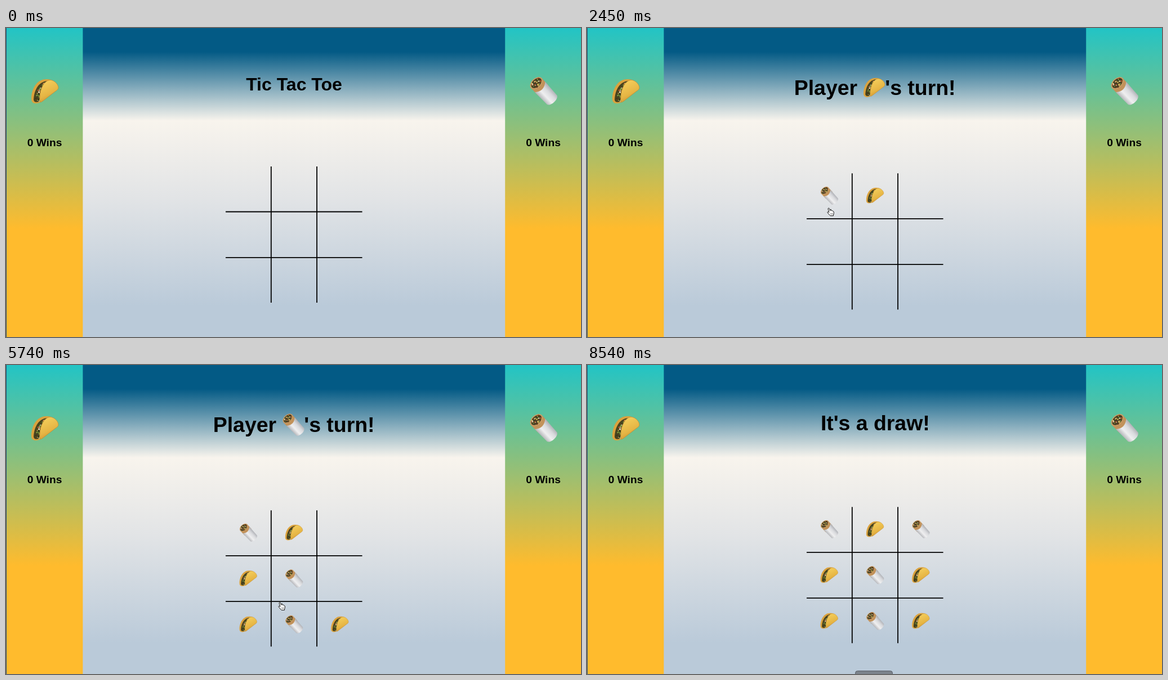
Write an HTML page that moves like this. It is 1021x549 px and loops after 8610 ms.

```html
<!DOCTYPE html>
<html lang="en">
<head>
<meta charset="utf-8">
<title>Tic Tac Toe</title>
<style>
  html, body { margin: 0; width: 100%; height: 100%; overflow: hidden; }
  svg { display: block; width: 1021px; height: 549px; }
  text { font: bold 19.2px "Liberation Sans", Arial, sans-serif; text-anchor: middle; }
  .title { font-size: 32px; }
  .status { font-size: 37.4px; }
  .start { text-anchor: start; }
</style>
</head>
<body>
<svg viewBox="0 0 1021 549">
  <defs>
    <linearGradient id="side" x2="0" y2="1">
      <stop stop-color="#22c4c5"/><stop offset=".65" stop-color="#ffbb2d"/>
    </linearGradient>
    <linearGradient id="sky" x2="0" y2="1">
      <stop offset=".077" stop-color="#035a85"/><stop offset=".3" stop-color="#f8f4ed"/>
      <stop offset=".55" stop-color="#e2e4e6"/><stop offset=".9" stop-color="#bacad9"/>
    </linearGradient>
    <linearGradient id="shell" x1=".3" x2=".7" y2="1">
      <stop stop-color="#f5cf5c"/><stop offset=".6" stop-color="#e6b544"/><stop offset="1" stop-color="#c98a2a"/>
    </linearGradient>
    <linearGradient id="foil">
      <stop stop-color="#b3b4b8"/><stop offset=".35" stop-color="#efeff0"/>
      <stop offset=".7" stop-color="#d9dadd"/><stop offset="1" stop-color="#aeb0b5"/>
    </linearGradient>

    <g id="taco">
      <path fill="#dba23d" d="M-24 14C-24-4-14-21 2-21C14-22 20-14 20-7L-10 21C-20 24-24 20-24 14Z"/>
      <path fill="#47431f" d="M-20 15C-19-3-10-18 6-18L8-10L-8 18C-15 21-20 20-20 15Z"/>
      <g id="tacoFilling"></g>
      <path fill="url(#shell)" stroke="#c08730" stroke-width=".7"
        d="M-9 18C-10 2-5-14 6-19C14-22 24-13 24-6C24-3 21-1 18 1L-4 18C-7 20-9 21-9 18Z"/>
    </g>
    <g id="burrito" transform="rotate(-43)">
      <path fill="#c2925a" d="M-13-19V0H13V-19Z"/>
      <path fill="url(#foil)" d="M-13-8Q0 3 13-9L12 23C9 30-9 30-12 23Z"/>
      <ellipse cy="-18" rx="13" ry="8.5" fill="#cb9d63"/>
      <ellipse cy="-18" rx="11" ry="6.8" fill="#453e24"/>
      <g id="burritoFilling"></g>
    </g>
  </defs>

  <rect width="1021" height="549" fill="url(#side)"/>
  <rect width="1" height="549" fill="#1f4a78"/>
  <rect x="136.4" width="749.8" height="549" fill="url(#sky)"/>

  <use href="#taco" x="69" y="112"/>
  <use href="#burrito" x="954" y="111"/>
  <text x="68.5" y="210">0 Wins</text>
  <text x="954" y="210">0 Wins</text>

  <text id="intro" class="title" x="511.5" y="111">Tic Tac Toe</text>
  <g id="turn">
    <text class="status start" x="367.8" y="119">Player</text>
    <use id="turnIcon" transform="translate(510 105.5) scale(.79)"/>
    <text class="status start" x="529.3" y="119">'s turn!</text>
  </g>
  <text id="draw" class="status" x="511.8" y="116">It's a draw!</text>

  <g id="board">
    <path d="M470.8 246V488M552 246V488M390 326.5H632.5M390 407.9H632.5" stroke="#000" stroke-width="1.8"/>
  </g>

  <path id="dock" d="M476.5 560V4a4 4 0 0 1 4-4H538.5a4 4 0 0 1 4 4V560Z" fill="#7c838c" stroke="#585e67"/>
  <g id="cursor">
    <circle id="ring" r="24.3" fill="none" stroke="#111" stroke-width="1.1"/>
    <path fill="#fff" stroke="#111" stroke-linejoin="round"
      d="M-1.5 1.5C-1.5 0 .7 0 1 1.5L2 5C4-.5 4 4 4.4 5.2C5 4.3 6.4 4.5 6.8 5.7C9 5 9.5 10 8 12.5V14H2.5L-2.6 8.2C-3 7.2-1.8 6.5-.8 7.3L.3 8Z"/>
    <path d="M3.2 9.3V12M5 9.3V12M6.8 9.3V12" stroke="#333" stroke-width=".6"/>
  </g>
</svg>
<script>
const LOOP = 8610, STEP = 70, GLIDE = 420;
const $ = id => document.getElementById(id);
const show = (el, on) => el.setAttribute("display", on ? "inline" : "none");
const svgNode = (name, attrs, parent) => {
  const el = document.createElementNS("http://www.w3.org/2000/svg", name);
  for (const key in attrs) el.setAttribute(key, attrs[key]);
  return parent.appendChild(el);
};

let seed = 7;
const random = () => (seed = seed * 16807 % 2147483647) / 2147483647;
const specks = ["#e9e0bd", "#7c9c3c", "#2c3a16", "#a8542c", "#5d3a1c", "#d3b25a"];

function fill(group, count, place) {
  for (let i = 0; i < count; i++) {
    const [cx, cy] = place(random(), random() - .5);
    svgNode("circle", { cx, cy, r: .8 + random() * .9, fill: specks[i % specks.length] }, group);
  }
}
fill($("tacoFilling"), 45, (u, v) => [-14 + 18 * u ** 1.4 + 9 * v, 16 - 31 * u + 4 * v]);
fill($("burritoFilling"), 30, (u, v) => {
  const angle = u * Math.PI * 2, r = Math.sqrt(v + .5);
  return [10 * r * Math.cos(angle), -18 + 6 * r * Math.sin(angle)];
});

// Clicks in playing order; players alternate, taco first.
const move = (time, cell, x, y) => ({ time, cell, x, y });
const moves = [
  move(1750, 1, 504, 333), move(2380, 0, 430, 302), move(2730, 3, 428, 370),
  move(3010, 4, 503, 346), move(4130, 8, 577, 453), move(4760, 7, 524, 458),
  move(5530, 6, 451, 459), move(6160, 2, 588, 314), move(6790, 5, 588, 354)
];
const icon = i => i % 2 ? "#burrito" : "#taco";
const pieces = moves.map(({ cell }, i) => svgNode("use", {
  href: icon(i),
  transform: `translate(${430 + cell % 3 * 81.3} ${285 + Math.floor(cell / 3) * 81.5}) scale(.645)`
}, $("board")));

// The pointer glides to each stop and rests there shortly before clicking.
const stops = [
  { arrive: 700, x: 512, y: 395 }, { arrive: 1190, x: 510, y: 344 },
  ...moves.map(({ time, x, y }) => ({ arrive: time - 2 * STEP, x, y })),
  { arrive: 8050, x: 557, y: 511 }
];

function pointerAt(t) {
  let x = 520, y = 428, left = 350;
  for (const stop of stops) {
    const start = Math.max(left, stop.arrive - GLIDE);
    if (t <= start) break;
    const p = Math.min(1, (t - start) / (stop.arrive - start)), ease = p * p * (3 - 2 * p);
    x += (stop.x - x) * ease;
    y += (stop.y - y) * ease;
    left = stop.arrive + 2 * STEP;
  }
  return [x, y];
}

function render(t) {
  const played = moves.filter(({ time }) => t >= time).length;
  const over = played === moves.length;
  show($("intro"), !played);
  show($("turn"), played && !over);
  show($("draw"), over);
  $("turnIcon").setAttribute("href", icon(played));
  $("board").setAttribute("transform", `translate(0 ${over ? 6.3 : played ? 12.3 : 0})`);
  pieces.forEach((piece, i) => show(piece, i < played));

  show($("cursor"), t >= 350 && t <= 8050);
  $("cursor").setAttribute("transform", `translate(${pointerAt(t)})`);
  show($("ring"), moves.some(({ time }) => t >= time - STEP && t < time));

  show($("dock"), t >= 8400);
  $("dock").setAttribute("transform", `translate(0 ${547.5 - (t - 8400) / STEP * 2})`);
}

function frame() {
  render(Math.floor(performance.now() % LOOP / STEP) * STEP);
  requestAnimationFrame(frame);
}
frame();
</script>
</body>
</html>
```
